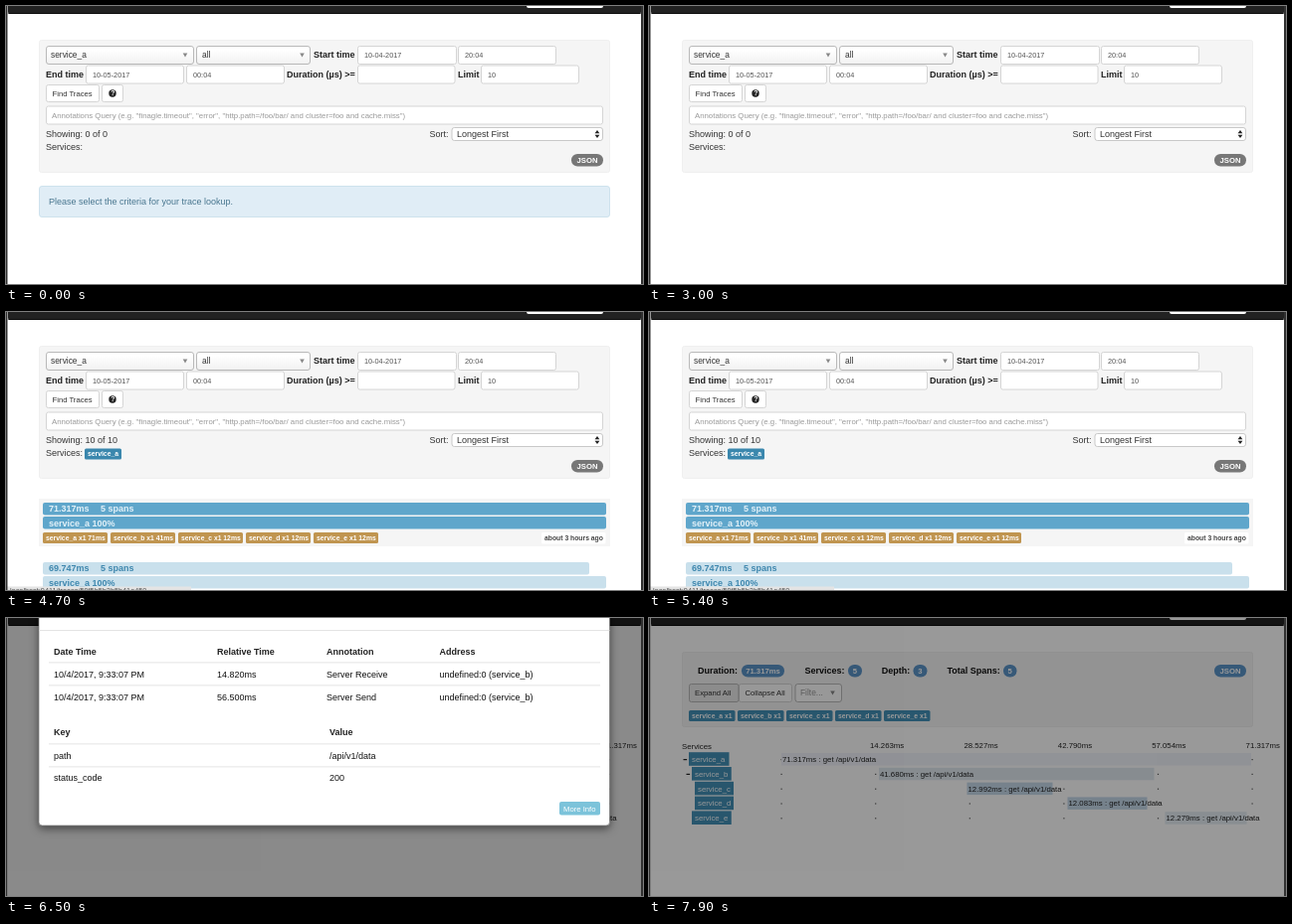
Animation of 640 by 280 pixels, one loop 8000 ms. Source, as an HTML page:

```html
<!DOCTYPE html>
<html lang="en">
<head>
<meta charset="utf-8">
<title>Trace lookup</title>
<style>
html, body { margin: 0; width: 100%; height: 100%; overflow: hidden; background: #fff; }
svg { display: block; width: 640px; height: 280px; }
text { font: 9px "Liberation Sans", Arial, sans-serif; fill: #333; white-space: pre; }
.b { font-weight: bold; fill: #222; }
.dark { fill: #111; }
.opt { font-size: 8.4px; }
.val { font-size: 7.3px; fill: #555; }
.btn { font-size: 7.7px; }
.hint { font-size: 7.8px; fill: #999; }
.faint { font-size: 8.4px; fill: #999; }
.tag { font-size: 6.8px; font-weight: bold; fill: #fff; }
.pill { font-size: 7.7px; font-weight: bold; fill: #fff; }
.span { font-size: 7.8px; fill: #222; }
.white { fill: #fff; }
.info { fill: #48768f; }
.res { font-weight: bold; fill: #3f87ae; }
.over { font-weight: bold; fill: #e3f1f8; }

.anim { animation: 8s step-end -20ms infinite; }
#form { animation-name: form; }
#notice { animation-name: notice; }
#none { animation-name: none-found; }
#drop { animation-name: drop; }
#results { animation-name: results; }
#hover { animation-name: hover; }
#trace { animation-name: trace; }
#shade { animation-name: shade; }
#modal { animation-name: modal; }
@keyframes form { 0% { opacity: 1 } 68.75%, 100% { opacity: 0 } }
@keyframes notice { 0% { opacity: 1 } 37.5%, 100% { opacity: 0 } }
@keyframes none-found { 0% { opacity: 1 } 42.5%, 100% { opacity: 0 } }
@keyframes drop { 0% { opacity: 0 } 11.25% { opacity: 1 } 25%, 100% { opacity: 0 } }
@keyframes results { 0% { opacity: 0 } 42.5% { opacity: 1 } 68.75%, 100% { opacity: 0 } }
@keyframes hover { 0% { opacity: 0 } 56.25% { opacity: 1 } 68.75%, 100% { opacity: 0 } }
@keyframes trace { 0% { opacity: 0 } 68.75%, 100% { opacity: 1 } }
@keyframes shade { 0% { opacity: 0 } 77.5% { opacity: .2 } 78.75% { opacity: .46 } 98.75%, 100% { opacity: .4 } }
@keyframes modal {
  0%, 78.75% { opacity: 0; transform: translateY(-52px) }
  80% { opacity: .67; transform: translateY(-22px) }
  81.25% { opacity: 1; transform: translateY(0) }
  82.5% { opacity: 1; transform: translateY(10px) }
  97.5% { opacity: .4; transform: translateY(-20px) }
  98.75%, 100% { opacity: 0; transform: translateY(-40px) }
}
</style>
</head>
<body>
<svg id="stage" viewBox="0 0 640 280">
  <defs>
    <linearGradient id="pick" x2="0" y2="1"><stop stop-color="#4285d4"/><stop offset="1" stop-color="#2a62bc"/></linearGradient>
    <linearGradient id="face" x2="0" y2="1"><stop offset=".2" stop-color="#fff"/><stop offset="1" stop-color="#f1f1f1"/></linearGradient>
    <linearGradient id="open" x2="0" y2="1"><stop stop-color="#eee"/><stop offset=".8" stop-color="#fff"/></linearGradient>
    <filter id="soft" x="-10%" y="-10%" width="120%" height="130%"><feDropShadow dx="0" dy="3" stdDeviation="4" flood-opacity=".5"/></filter>
    <filter id="lift" x="-10%" y="-10%" width="120%" height="120%"><feDropShadow dx="0" dy="2" stdDeviation="1.5" flood-opacity=".2"/></filter>
  </defs>
</svg>
<script>
const text = (x, y, s, cls = '') => `<text x="${x}" y="${y}" class="${cls}">${s}</text>`;
const box = (x, y, w, h, fill, more = '') => `<rect x="${x}" y="${y}" width="${w}" height="${h}" fill="${fill}" ${more}/>`;
const framed = (x, y, w, h, r = 2, fill = '#fff', line = '#ccc') =>
  box(x + .5, y + .5, w - 1, h - 1, fill, `rx="${r}" stroke="${line}" stroke-width=".8"`);
const tri = (x, y, w, h, fill = '#888') => `<path d="M${x - w} ${y}h${2 * w}l${-w} ${h}z" fill="${fill}"/>`;
const group = (id, ...parts) => `<g id="${id}" class="anim">${parts.join('')}</g>`;
const field = (x, y, w, value = '') => framed(x, y, w, 19) + text(x + 7, y + 12.3, value, 'val');
const tag = (x, y, w, s, fill) => box(x, y, w, 11, fill, 'rx="1.6"') + text(x + 3, y + 7.9, s, 'tag');
const pill = (x, y, w, s, fill) => box(x, y, w, 12.5, fill, 'rx="6.2"') +
  `<text x="${x + w / 2}" y="${y + 9}" text-anchor="middle" class="pill">${s}</text>`;
const names = [...'abcde'].map(c => 'service_' + c);

const page = box(0, 0, 640, 280, '#fff');

const nav = box(2, -4, 636, 12, '#222', 'rx="2"') + box(2.5, 7, 635, 1, '#0c0c0c') +
  box(523, -4, 77, 6, '#fff', 'rx="2"');
const sides = box(0, 0, 1.5, 280, '#303030') + box(638, 0, 2, 280, '#303030');

const panel = h => framed(33, 34, 574, h, 2, '#f5f5f5', '#ececec');

const form = group('form',
  panel(134),
  framed(40, 40, 149, 19, 2.5, 'url(#face)', '#aaa'), text(45, 52, names[0], 'opt'), tri(180, 47.5, 2.3, 4),
  framed(191, 40, 115, 19, 2.5, 'url(#face)', '#aaa'), text(197, 52, 'all', 'opt'), tri(297.5, 47.5, 2.3, 4),
  text(309, 52.2, 'Start time', 'b'), field(353, 40, 100, '10-04-2017'), field(454, 40, 99, '20:04'),
  text(40, 71.5, 'End time', 'b'), field(80, 59.5, 99, '10-05-2017'), field(181, 59.5, 99, '00:04'),
  text(282, 71.5, 'Duration (µs) &gt;=', 'b'), field(353, 59.5, 98.5),
  text(454, 71.5, 'Limit', 'b'), field(477, 59.5, 99, '10'),
  framed(40, 79, 54, 18), text(46.5, 90.5, 'Find Traces', 'btn'),
  framed(96, 79, 22, 18), '<circle cx="107" cy="88" r="3.7" fill="#222"/>', text(105.2, 90.3, '?', 'tag'),
  framed(40, 100.5, 560, 19),
  text(46, 113, 'Annotations Query (e.g. "finagle.timeout", "error", "http.path=/foo/bar/ and cluster=foo and cache.miss")', 'hint'),
  text(40, 132, 'Showing:'), text(40, 145.3, 'Services:'),
  text(425.5, 132.3, 'Sort:'), framed(447.5, 122, 152.5, 14, 2.5, '#fff', '#bbb'), text(453, 132.3, 'Longest First'),
  tri(594, 129.8, 2.4, 3.2, '#222'), tri(594, 128.2, 2.4, -3.2, '#222'),
  pill(568, 149, 32, 'JSON', '#777'));

const none = group('none', text(79.5, 132, '0 of 0'));

const notice = group('notice',
  framed(33, 181, 574, 32, 2.5, '#e0edf6', '#c6deea'),
  text(43, 200.2, 'Please select the criteria for your trace lookup.', 'info'));

const items = ['aiohttp_client', 'aiohttp_server', ...names];
const drop = group('drop',
  box(40, 58, 149, 133.5, '#fff', 'rx="2" stroke="#aaa" stroke-width=".8" filter="url(#lift)"'),
  framed(40, 40, 149, 19, 2, 'url(#open)', '#aaa'), text(45, 52, names[0], 'opt'), tri(180, 50, 2.3, -4),
  framed(43, 61, 143, 16.5, 0, '#fff', '#aaa'), box(47, 64, .8, 10, '#333'),
  '<g fill="none" stroke="#666"><circle cx="177" cy="68" r="2.4"/><path d="M178.8 69.8l3 3" stroke-width="1.5"/></g>',
  box(43, 111, 143, 15.5, 'url(#pick)'),
  items.map((s, i) => text(47, 91.2 + i * 15.5, s, i === 2 ? 'opt white' : 'opt')).join(''));

const entry = (y, w, time, fill, cls) =>
  box(37, y, w, 12.5, fill, 'rx="2"') + box(37, y + 14, 566, 12.5, fill, 'rx="2"') +
  text(43, y + 9.3, time, cls) + text(95, y + 9.3, '5 spans', cls) + text(43, y + 23.5, 'service_a 100%', cls);
const counts = fill => [71, 41, 12, 12, 12].map((ms, i) =>
  tag(37 + 68 * i, 222, 65, `${names[i]} x1 ${ms}ms`, fill)).join('');
const age = fill => `<text x="541" y="230" class="tag" style="fill:${fill}">about 3 hours ago</text>`;

const results = group('results',
  text(79.5, 132, '10 of 10'), tag(79, 137.5, 37, names[0], '#3a87ad'),
  entry(192, 566, '71.317ms', '#c9e0ec', 'res'), counts('#777'), age('#999'),
  entry(252, 549, '69.747ms', '#c9e0ec', 'res'));

const hover = group('hover',
  box(33, 188, 574, 48, '#f5f5f5'),
  entry(192, 566, '71.317ms', '#5fa6cb', 'over'), counts('#c09550'),
  box(538, 222, 64.5, 11.5, '#fff', 'rx="1.6"'), age('#444'),
  box(0, 276.5, 186, 4, '#e4e4e4'), text(4, 282.5, 'localhost:9411/traces/59f5b5b2b5b41a450', 'val'));

// [indent, bar start, bar width, duration, colour]
const spans = [
  [0, 133, 472, '71.317', '#f1f4fb'],
  [3, 231, 276.5, '41.680', '#e0e9f0'],
  [6, 319.5, 86, '12.992', '#c4d8e9'],
  [6, 420.5, 80, '12.083', '#c4d8e9'],
  [3, 518.5, 82, '12.279', '#e4edf4']
];
const row = ([indent, x, w, ms, fill], i) => {
  const y = 136 + i * 14.8;
  const dots = [0, 1, 2, 3, 4, 5].map(n => box(132.5 + n * 94.6, y + 6, 1.2, 1.2, '#555')).join('');
  return dots + box(x, y, w, 12.5, fill) + box(40 + indent, y - .8, 40.5 - indent / 4, 13.6, '#4391b8') +
    text(43 + indent, y + 9, names[i], 'span white') + text(x + 1, y + 9, ms + 'ms : get /api/v1/data', 'span') +
    (i < 2 ? box(34.5 + indent, y + 6, 3.6, 1.2, '#222') : '');
};
const blue = '#5b94c8';
const trace = group('trace',
  panel(76),
  text(49, 56, 'Duration:', 'b dark'), pill(93, 47, 43, '71.317ms', blue),
  text(156.5, 56, 'Services:', 'b dark'), pill(200, 47, 14, '5', blue),
  text(233.8, 56, 'Depth:', 'b dark'), pill(265.5, 47, 14, '3', blue),
  text(299.5, 56, 'Total Spans:', 'b dark'), pill(356, 47, 13.5, '5', blue),
  pill(568, 47, 32, 'JSON', blue),
  framed(90, 66, 54, 19), framed(40, 66, 50.5, 19, 2, '#ebebeb', '#aaa'),
  text(46, 78.3, 'Expand All', 'btn'), text(96.5, 78.3, 'Collapse All', 'btn'),
  framed(146.5, 66, 47.5, 19, 2.5, '#fff', '#aaa'), text(152, 78.3, 'Filte...', 'faint'), tri(184.5, 73.5, 2.3, 4),
  names.map((s, i) => tag(40 + 49 * i, 93, 46.5, s + ' x1', '#4391b8')).join(''),
  text(33, 131.5, 'Services', 'span'),
  ['14.263', '28.527', '42.790', '57.054', '71.317'].map((s, i) => text(222 + 94.4 * i, 131.3, s + 'ms', 'span')).join(''),
  spans.map(row).join(''));

const cells = (y, cols, vals, cls = 'dark') => vals.map((s, i) => text(cols[i], y, s, cls)).join('');
const rule = (y, x = 43, w = 554) => box(x, y, w, .8, '#ddd');
const wide = [48, 212, 322, 435.5], pair = [48, 325];
const modal = group('modal',
  box(33, -60, 573.5, 269, '#fff', 'rx="3.5" stroke="#666" stroke-width=".6" filter="url(#soft)"'),
  rule(12, 33, 573.5),
  cells(36.5, wide, ['Date Time', 'Relative Time', 'Annotation', 'Address'], 'b'), rule(44.5), rule(67.5),
  cells(60, wide, ['10/4/2017, 9:33:07 PM', '14.820ms', 'Server Receive', 'undefined:0 (service_b)']),
  cells(82.5, wide, ['10/4/2017, 9:33:07 PM', '56.500ms', 'Server Send', 'undefined:0 (service_b)']),
  cells(118, pair, ['Key', 'Value'], 'b'), rule(126.5), rule(149.5),
  cells(141.5, pair, ['path', '/api/v1/data']),
  cells(164, pair, ['status_code', '200']),
  box(556, 185, 41, 13.5, '#7cc3da', 'rx="2"'), text(560, 194.6, 'More Info', 'btn white'));

const shade = group('shade', box(1.5, 0, 637, 280, '#000'));

document.getElementById('stage').insertAdjacentHTML('beforeend',
  page + form + none + notice + drop + results + hover + trace + nav + shade + modal + sides);
</script>
</body>
</html>
```
